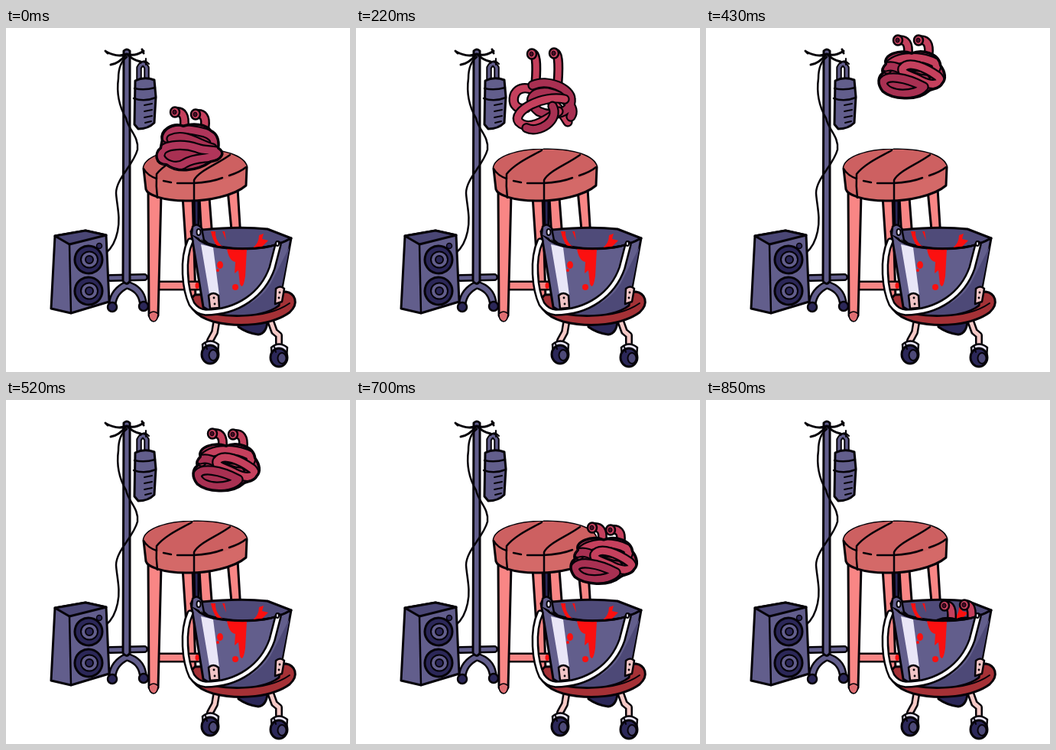
Recreate the animation shown at these times as an HTML page with a canvas. Size 450 px wide and 450 px high, loop 0.91 s.

```html
<!DOCTYPE html>
<html lang="en">
<head>
<meta charset="utf-8">
<title>Jump into the bucket</title>
<style>
html, body { margin: 0; width: 100%; height: 100%; overflow: hidden; background: #fff; }
canvas { display: block; }
</style>
</head>
<body>
<canvas id="stage" width="450" height="450"></canvas>
<script>
const ctx = document.getElementById('stage').getContext('2d');
const INK = '#050208', PURPLE = '#625e8c', DARK = '#2b2758', SHADE = '#4d4977';
const PINK = '#f98685', SEAT = '#cd6061', SIDE = '#d46968', RING = '#a53136';
const BLOOD = '#fb1010', PALE = '#e9e6f7', FLESH = '#c5405d', DEEP = '#a83052';

ctx.lineCap = ctx.lineJoin = 'round';

function shape(d, fill, width = 3) {
  const path = new Path2D(d);
  if (fill) { ctx.fillStyle = fill; ctx.fill(path); }
  if (width) { ctx.strokeStyle = INK; ctx.lineWidth = width; ctx.stroke(path); }
}
const line = (d, width = 2.5) => shape(d, null, width);

// A coloured stroke with an ink edge on both sides.
function tube(d, color, width, edge = 2.5) {
  const path = d instanceof Path2D ? d : new Path2D(d);
  ctx.strokeStyle = INK; ctx.lineWidth = width + edge * 2; ctx.stroke(path);
  ctx.strokeStyle = color; ctx.lineWidth = width; ctx.stroke(path);
}

function oval(x, y, rx, ry, fill, width = 2.5, turn = 0) {
  const path = new Path2D();
  path.ellipse(x, y, rx, ry, turn, 0, 7);
  ctx.fillStyle = fill; ctx.fill(path);
  if (width) { ctx.strokeStyle = INK; ctx.lineWidth = width; ctx.stroke(path); }
}

function drip() {
  tube('M136 327L181 326', PURPLE, 5);
  tube('M139 361Q141 344 158 336Q176 341 179 358', PURPLE, 6);
  oval(139, 365, 6, 6, DARK);
  oval(180, 364, 6, 6, DARK);
  shape('M154 30Q158 26 162 30L162 331Q158 338 153 331Z', PURPLE);
  line('M131 31Q146 39 158 34Q168 38 180 30M137 48Q147 47 158 34Q166 42 176 44M130 30L133 33M178 28L180 33', 3);
  line('M158 38Q147 46 147 66C144 88 150 106 157 118C160 133 174 142 172 159C167 179 144 197 144 216C145 232 150 248 146 266Q142 285 131 294', 2.5);
  tube('M174 68L174 52Q179 42 184 52L184 66', PURPLE, 3.5, 2);
  line('M183 40L183 48M176 46Q181 40 187 47', 2);
  shape('M169 69Q181 63 194 68L196 90L194 124Q186 132 173 132L168 126Z', PURPLE);
  line('M168 79Q181 82 195 78M167 92Q181 97 196 91');
  line('M181 101L191 99M181 109L191 107M181 117L191 115M182 124L190 122', 2);
}

function speaker() {
  shape('M64 272L104 265L131 271L135 358L85 373L59 367Z', PURPLE);
  shape('M64 272L104 265L131 271L83 283Z', '#4a4675');
  line('M83 283L85 373');
  for (const y of [303, 344]) {
    oval(108, y, 18, 18, DARK, 3, .2);
    oval(109, y, 11, 10.5, PURPLE, 2);
    oval(109, y, 5, 5, DARK, 2);
  }
  oval(122, 285, 3.5, 3.5, DARK, 1.5);
  oval(124, 294, 1.2, 1.2, INK, 0);
}

function stool() {
  shape('M246 220L252 220L252 275L247 275Z', DARK);
  shape('M253 222L266 222L270 275L256 275Z', PINK);
  shape('M290 212L303 210L307 275L296 275Z', PINK);
  shape('M231 220L244 220L248 355L240 355Z', PINK);
  tube('M197 337L252 337', PINK, 8);
  shape('M186 214L203 217L199 376Q193 389 187 376Z', PINK);
  shape('M187 374Q193 368 199 374Q198 384 193 384Q187 383 187 374Z', '#e06f73', 1.5);
  shape('M180 184C181 169 210 159 245 159C286 158 312 168 315 182L314 206C299 219 264 227 235 226C205 226 185 218 183 211Z', SIDE);
  ctx.save();
  shape('M180 184C181 169 210 159 245 159C286 158 312 168 315 182C303 196 272 204 243 203C208 202 186 196 180 184Z', SEAT, 0);
  line('M180 184Q185 193 197 197M206 200L216 202M224 203L245 203Q268 202 283 196M292 193Q307 188 314 182', 2.5);
  line('M243 160C229 168 208 177 197 191Q196 207 198 222M293 166C275 179 252 187 246 199L246 225', 2.5);
  ctx.restore();
}

function bucketBack() {
  shape('M243 264Q249 253 257 264Q305 259 342 263L373 275Q358 285 336 287Q294 292 264 282Z', '#4f4b79');
  shape('M268 266L274 266Q273 277 282 285L288 288L276 285Q270 277 268 266ZM331 271L337 269L335 276L343 278L334 287L322 288Q331 282 331 271ZM283 266L286 266L288 278Z', BLOOD, 0);
}

function caster(x, y, leg) {
  tube(leg, '#f6c9c6', 5, 2.5);
  shape(`M${x - 10} ${y - 9}Q${x} ${y - 18} ${x + 11} ${y - 9}L${x + 10} ${y + 3}L${x - 9} ${y + 3}Z`, PALE, 2.5);
  oval(x, y + 4, 11, 12, DARK, 3);
  oval(x + 4, y + 5, 5.5, 7, SHADE, 2);
  line(`M${x - 6} ${y - 10}L${x - 4} ${y - 3}`, 2);
}

function bucketFront() {
  shape('M304 385L342 385Q340 400 330 401Q315 399 304 391Z', DARK);
  caster(267, 423, 'M275 386L273 398L267 409');
  caster(357, 427, 'M346 383L351 397L357 402L357 412');
  shape('M247 349C234 361 247 377 271 384C307 393 349 388 371 372C384 360 378 347 366 345Z', RING);
  line('M248 366C272 381 340 382 371 360', 2);
  shape('M242 266Q251 280 270 285Q304 292 338 287Q357 284 373 275L357 363C337 379 278 380 258 365Z', PURPLE);
  shape('M371 286L356 362C338 377 300 377 277 373Q333 367 351 325Z', SHADE, 0);
  shape('M255 283L271 287L279 350L266 348Z', PALE, 0);
  shape('M289 289L315 289L313 325Q310 344 306 335L304 317L299 321L300 306Q292 305 289 289Z', BLOOD, 0);
  oval(280, 310, 4, 5, BLOOD, 0);
  oval(300, 339, 4, 4, BLOOD, 0);
  oval(250, 337, 2.5, 4, BLOOD, 0);
  oval(277, 317, 2, 2, BLOOD, 0);
  line('M242 266Q251 280 270 285Q304 292 338 287Q357 284 373 275');
  shape('M243 270L244 260Q250 254 256 262L259 278', PURPLE, 2.5);
  shape('M265 350Q271 344 278 350L279 366L267 367Z', '#f0c4c5', 2.5);
  shape('M353 341Q359 336 364 341L361 358L352 361Z', '#f0c4c5', 2.5);
  for (const [x, y] of [[272, 353], [273, 361], [358, 346], [357, 353]]) oval(x, y, 1.4, 1.4, INK, 0);
  tube('M241 279C230 303 234 342 243 361Q250 371 261 372C304 372 336 348 348 314L356 283', '#fff', 4.5);
  oval(252, 267, 2.5, 4, PALE, 2);
  oval(355, 282, 2, 3, PALE, 2);
}

// Body looks, centred on 0,0: outline first, then the tubes on top.
const looks = {
  heap: {
    skin: 'M-36 -8C-39 -22 -22 -32 -8 -27C4 -31 22 -30 28 -21C38 -16 39 -6 38 2C48 8 42 18 28 20C8 34 -18 34 -30 24C-46 24 -46 8 -38 2Z',
    coils: ['M-30 -11C-27 -27 0 -23 20 -18C37 -12 36 0 24 4', 'M-24 -10C-6 -18 10 -4 30 2',
      'M-38 14C-41 -4 -8 -4 10 2C22 7 36 3 38 9C30 18 10 12 -6 22C-18 30 -34 23 -38 14Z']
  },
  knot: {
    skin: 'M-8 -24C12 -30 34 -20 34 -8C46 0 46 16 34 18C24 32 -20 38 -30 26C-38 20 -34 6 -20 2Z',
    coils: ['M-22 4C-46 10 -44 -24 -18 -18C0 -18 24 8 32 20', 'M-14 -22C6 -30 36 -18 36 -6C38 8 14 16 -6 8C-24 -4 -14 -16 6 -14C28 -10 44 4 36 14',
      'M28 -6C0 -12 -42 8 -32 20C-18 32 6 16 20 8', 'M-22 27C-6 34 22 18 12 2']
  },
  coil: {
    skin: 'M-34 -14C-38 -26 -16 -34 0 -28C14 -34 36 -28 38 -12C44 -4 46 6 40 12C36 20 26 18 22 22C6 36 -26 32 -38 22C-46 12 -44 2 -38 -2C-40 -8 -36 -12 -34 -14Z',
    coils: ['M-32 -7C-28 -24 10 -27 30 -16C40 -6 18 4 2 0', 'M-34 -10C-16 -16 -4 6 18 6',
      'M-12 -8C-4 -20 20 -8 34 2C44 12 28 16 12 8C2 2 -14 0 -12 -8', 'M-38 12C-36 -2 -6 4 16 16C6 28 -32 30 -38 12Z']
  }
};

// time, centre x, centre y, stretch, left eye x, y, right eye x, y, stalk bend
const keys = [
  [0, 240, 155, 1, -19, -45, 8, -42, 12],
  [100, 237, 165, .83, -19, -42, 11, -42, 6],
  [130, 237, 166, .82, -19, -40, 11, -40, 6],
  [220, 245, 100, 1.14, -15, -66, 14, -67, 5],
  [310, 258, 69, 1.08, -17, -53, 11, -53, 10],
  [430, 269, 61, 1, -18, -45, 9, -45, 13],
  [520, 288, 88, 1, -18, -44, 9, -43, 13],
  [610, 311, 142, 1, -17, -41, 9, -41, 13],
  [700, 324, 210, .98, -15, -43, 9, -40, 13],
  [790, 327, 298, .95, -16, -45, 10, -44, 12],
  [850, 328, 314, .95, -16, -45, 10, -46, 9]
];
const steps = [0, 30, 70, 100, 130, 160, 190, 220, 250, 310, 370, 430, 490, 520, 580, 610, 670, 700, 760, 790, 820, 850];
const LOOP = 910;

function poseAt(time) {
  const next = keys.findIndex(key => key[0] > time);
  if (next < 0) return keys.at(-1);
  const a = keys[next - 1], b = keys[next], k = (time - a[0]) / (b[0] - a[0]);
  return a.map((v, i) => v + (b[i] - v) * k);
}

function creature(time) {
  const [, x, y, stretch, lx, ly, rx, ry, bend] = poseAt(time);
  const look = looks[time < 70 ? 'heap' : time < 310 ? 'knot' : 'coil'];
  const scaled = d => {
    const path = new Path2D();
    path.addPath(new Path2D(d), new DOMMatrix([1, 0, 0, stretch, 0, 0]));
    return path;
  };
  ctx.save();
  // Only what is above the front rim can be seen.
  ctx.clip(new Path2D('M0 0H450V275H373Q357 284 338 287Q304 292 270 285Q251 280 242 266H0Z'));
  ctx.translate(x, y);
  for (const [ex, ey] of [[lx, ly], [rx, ry]]) {
    const root = ex + bend;
    tube(`M${ex} ${ey}Q${root + 3} ${ey - 3} ${root} ${-25 * stretch}`, FLESH, 8);
    oval(ex, ey, 6, 6.5, FLESH, 2.5);
    oval(ex - .5, ey, 2.5, 3, '#4a0c25', 1);
  }
  if (look !== looks.knot) {
    const skin = scaled(look.skin);
    ctx.fillStyle = DEEP; ctx.fill(skin);
    ctx.strokeStyle = INK; ctx.lineWidth = 3; ctx.stroke(skin);
    ctx.clip(skin);
  }
  look.coils.forEach((d, i) => tube(scaled(d), i % 2 ? DEEP : look === looks.heap ? '#b0355a' : FLESH, 9, 2.2));
  if (look !== looks.knot) {
    ctx.strokeStyle = INK; ctx.lineWidth = 4; ctx.stroke(scaled(look.skin));
  }
  ctx.restore();
}

function render(now) {
  const time = steps.findLast(step => step <= now % LOOP);
  ctx.fillStyle = '#fff';
  ctx.fillRect(0, 0, 450, 450);
  drip();
  speaker();
  stool();
  bucketBack();
  creature(time);
  bucketFront();
}

const start = performance.now();
function tick() {
  render(performance.now() - start);
  requestAnimationFrame(tick);
}
tick();
</script>
</body>
</html>
```
